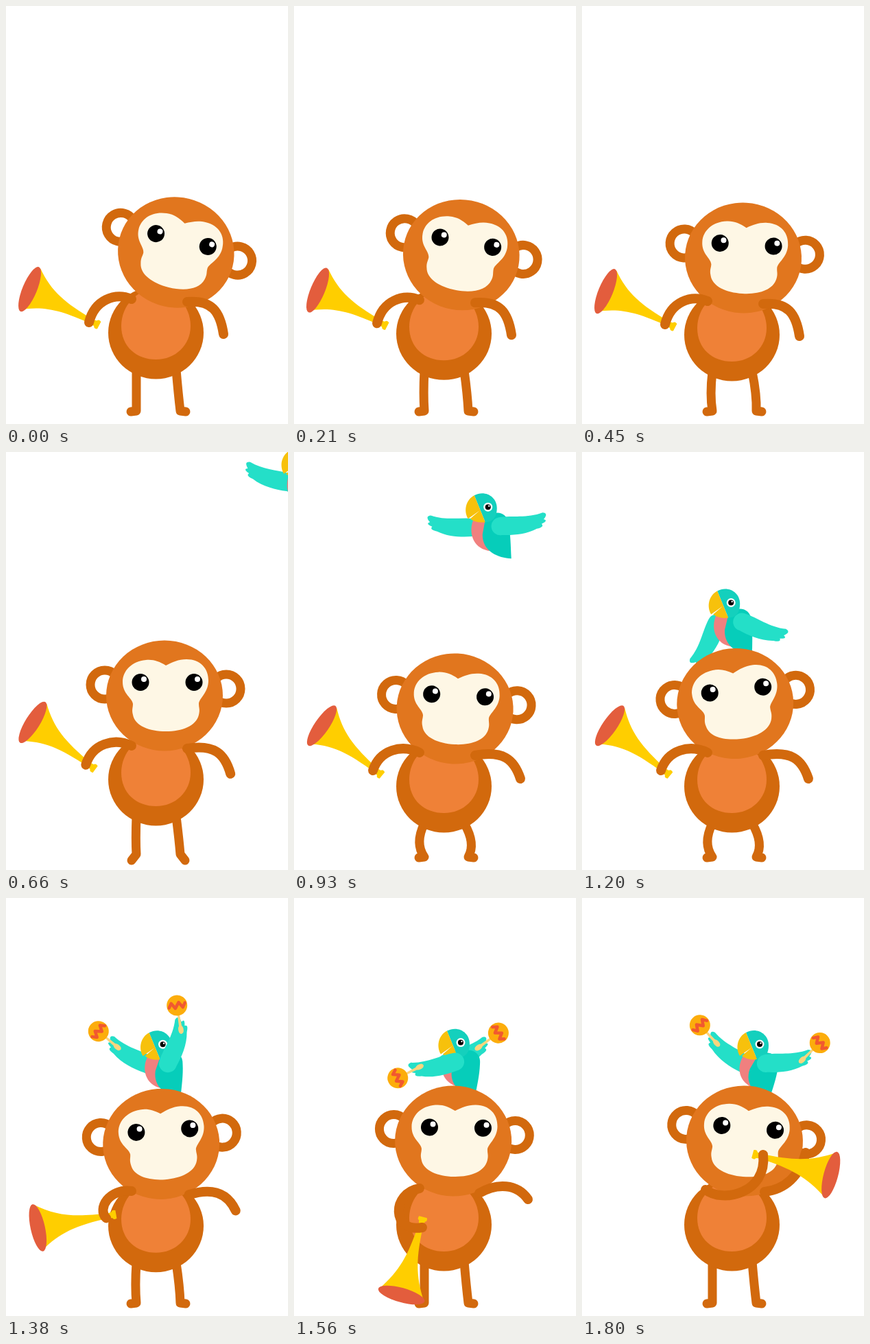
An HTML page with a canvas that plays this animation: 411 by 609 pixels, repeating every 1.83 s.

```html
<!DOCTYPE html>
<html lang="en">
<head>
<meta charset="utf-8">
<title>Monkey band</title>
<style>
html, body { margin: 0; width: 100%; height: 100%; overflow: hidden; background: #fff; }
canvas { display: block; }
</style>
</head>
<body>
<canvas id="stage" width="411" height="609"></canvas>
<script>
const ctx = document.getElementById('stage').getContext('2d');
const LOOP = 1830, STEP = 30, RAD = Math.PI / 180;
const FUR = '#e1761e', DARK = '#d2690d', BELLY = '#ef8137', CREAM = '#fef7e5';
const YELLOW = '#ffce00', RED = '#e35d3d', TEAL = '#06cdba', WING = '#24dfc8';

const shapes = {};
const addShape = (name, d) => shapes[name] = new Path2D(d);
addShape('belly', 'M168 466C168 438 190 412 218.5 412S269 438 269 466S247 515 218.5 515S168 496 168 466Z');
addShape('face', `M2 -44C-8 -50 -16 -53 -27 -52C-48 -50 -61 -36 -61 -20C-61 -2 -47 3 -46 12
  C-46 18 -48 20 -46 28C-43 44 -22 52 2 52C26 52 46 44 50 28C52 20 50 18 50 12
  C50 4 64 -4 64 -22C64 -40 52 -53 32 -53C20 -53 12 -49 2 -44Z`);
addShape('chest', 'M-22 20C-29 40 -20 62 4 64L0 20Z');
addShape('torso', 'M-4 18C5 4 28 4 30 25C33 40 33 55 34 75C15 74 -8 65 -8 40Z');
addShape('crown', 'M-20 -17C-5 -25 13 -16 13 2C13 13 8 22 -4 22Z');
addShape('beak', 'M-20 -17C-32 -11 -36 5 -29 17L-12 5L-26 17Q-17 24 -4 22Z');
addShape('wing', `M0 -13C20 -13 40 -5 64 -10Q73 -8 64 0Q71 3 60 6Q64 11 52 12
  C35 18 15 16 0 13A13 13 0 0 1 0 -13Z`);
addShape('grip', 'M-10 -3Q-14 0 -10 3Q-4 5 0 2L18 1.5V-1.5L0 -2Q-4 -5 -10 -3Z');
addShape('zigzag', 'M28 -12L34 -8L26 -3L34 3L26 8L32 12');

// Shoulder, two handles and hand, for the rest, hip and mouth poses.
const leftArm = [
  [183, 427, 159, 417, 129, 428, 121, 461],
  [183, 423, 142, 430, 142, 488, 187, 480],
  [180, 425, 205, 445, 270, 430, 264, 374]];
const rightArm = [
  [264, 431, 300, 428, 312, 445, 317, 478],
  [270, 430, 296, 415, 325, 416, 341, 439],
  [266, 428, 295, 425, 318, 405, 326, 371]];

const part = (t, a, b) => Math.min(1, Math.max(0, (t - a) / (b - a)));
const smooth = u => u * u * (3 - 2 * u);
const ease = (t, a, b) => smooth(part(t, a, b));
const wave = (t, peak, period) => Math.cos(2 * Math.PI * (t - peak) / period);

// Eased value through [time, value] points.
const through = (t, first, ...rest) => rest.reduce(
  ([t0, v0, sum], [t1, v1]) => [t1, v1, sum + (v1 - v0) * ease(t, t0, t1)],
  [...first, first[1]])[2];

function motion(t) {
  const swing = ease(t, 1230, 1560), play = ease(t, 1560, 1800);
  const raise = ease(t, 450, 750) - swing;
  const crouch = 3 * ease(t, 0, 450) - 2 * ease(t, 450, 660)
    + 10 * ease(t, 660, 930) - 11 * ease(t, 1200, 1440);
  const tilt = through(t, [0, 14], [660, 0], [930, 3], [1200, -6.5], [1800, 5]);
  const headY = through(t, [0, 359], [450, 367], [660, 355], [930, 374], [1200, 366.5], [1500, 354]);
  return { swing, play, raise, crouch, tilt, headX: 231 + 1.2 * tilt, headY };
}

function group(x, y, angle, draw) {
  ctx.save();
  ctx.translate(x, y);
  ctx.rotate(angle * RAD);
  draw();
  ctx.restore();
}

function fill(path, color) {
  ctx.fillStyle = color;
  ctx.fill(path);
}

function ellipse(x, y, rx, ry, color) {
  const path = new Path2D();
  path.ellipse(x, y, rx, ry, 0, 0, 7);
  fill(path, color);
}

function stroke(path, width, color) {
  ctx.lineWidth = width;
  ctx.strokeStyle = color;
  ctx.stroke(path);
}

// The raise grows from the shoulder to the hand.
function armCurve([rest, hip, mouth], m, raiseX, raiseY) {
  return rest.map((v, i) => {
    const lift = m.raise * Math.floor(i / 2) / 3;
    return v + (hip[i] - v) * m.swing + (mouth[i] - hip[i]) * m.play
      + (i % 2 ? m.crouch + raiseY * lift : raiseX * lift);
  });
}

function drawArm([x, y, ...curve]) {
  const path = new Path2D();
  path.moveTo(x, y);
  path.bezierCurveTo(...curve);
  stroke(path, 14, DARK);
}

function drawLeg(hipX, ankleX, side, crouch, toe) {
  const knee = (hipX + ankleX) / 2 + side * 1.3 * crouch;
  const path = new Path2D();
  path.moveTo(hipX, 530 + crouch);
  path.quadraticCurveTo(knee, 565 + crouch / 2, ankleX, 590 - 4 * toe);
  path.lineTo(ankleX + side * (8 - toe), 591 + 4 * toe);
  stroke(path, 13, DARK);
}

function drawBody(t, crouch) {
  const toe = ease(t, 450, 540) - ease(t, 660, 780);
  drawLeg(190, 190, -1, crouch, toe);
  drawLeg(248, 254, 1, crouch, toe);
  group(0, crouch, 0, () => {
    ellipse(218.5, 476, 69.5, 67.5, DARK);
    fill(shapes.belly, BELLY);
  });
}

function drawHead(m) {
  group(m.headX, m.headY, m.tilt, () => {
    for (const [x, y] of [[-87, -16], [90, -10]]) {
      const ring = new Path2D();
      ring.arc(x, y, 21, 0, 7);
      stroke(ring, 13, DARK);
    }
    ellipse(0, 0, 85, 80.5, FUR);
    fill(shapes.face, CREAM);
    for (const x of [-35, 43]) {
      ellipse(x, -19.5, 12.5, 12.5, '#000');
      ellipse(x + 5, -24, 4, 4, '#fff');
    }
  });
}

function drawHorn(m, handX, handY) {
  const length = 114 + 4 * m.swing;
  group(handX, handY, 207.5 + 12 * m.raise - 102 * m.swing - 90.5 * m.play, () => {
    ctx.translate(-15, 3);
    fill(new Path2D(`M0 -6Q5 -8 6 -4.5L11 -3.5C60 -6 85 -12 ${length} -34V34
      C85 12 60 6 11 3.5L6 4.5Q5 8 0 6Z`), YELLOW);
    group(length, 0, 5 * m.swing - 5, () => ellipse(0, 0, 10.5, 35, RED));
  });
}

// Feathers stay on the lower side whichever way the wing points.
function drawWing(x, y, angle, size, shake) {
  const flip = Math.cos(angle * RAD) < 0 ? -1 : 1;
  group(x, y, angle, () => {
    ctx.scale(1, flip);
    fill(shapes.wing, WING);
    if (!size) return;
    group(58, 0, shake - 9, () => {
      ctx.scale(size, size);
      fill(shapes.grip, '#fbd57e');
      ellipse(30, 0, 15, 15, '#fcad0c');
      stroke(shapes.zigzag, 4.5, '#f1592f');
    });
  });
}

function drawBird(t, m) {
  const fly = part(t, 540, 1170), perch = part(t, 1200, 1800);
  const along = (a, b, c) => a * (1 - fly) ** 2 + 2 * b * fly * (1 - fly) + c * fly ** 2;
  const x = along(532, 250, m.headX - 6 + 28 * perch);
  const y = along(21, -21, m.headY - 147 + 6 * perch);

  const land = ease(t, 930, 1200), flap = 12 * wave(t, 660, 360) * (1 - land);
  const front = -9 - flap + 27 * land - 208 * m.swing + 181 * m.play;
  const back = 187 + flap - 69 * land + 215 * m.swing - 115 * m.play;
  const lean = 20 * part(t, 1080, 1800), size = ease(t, 1230, 1350);

  group(x, y, 0, () => {
    drawWing(-21, 30, back, size, 0);
    group(0, 20, lean, () => {
      ctx.translate(0, -20);
      fill(shapes.chest, '#f0807f');
      fill(shapes.torso, TEAL);
    });
    fill(shapes.crown, '#14d0bd');
    fill(shapes.beak, '#f7c10c');
    ellipse(0, 0, 6.5, 6.5, '#fff');
    ellipse(0, 0, 4, 4, '#000');
    ellipse(1.5, -1.5, 1.2, 1.2, '#fff');
    const rootX = 8 + 10 * Math.cos(front * RAD) - .45 * lean;
    drawWing(rootX, 28, front, size, -26 * wave(t, 1800, 480));
  });
}

function draw(t) {
  const m = motion(t), left = armCurve(leftArm, m, -6, -8);
  ctx.fillStyle = '#fff';
  ctx.fillRect(0, 0, 411, 609);
  ctx.lineCap = ctx.lineJoin = 'round';
  drawBody(t, m.crouch);
  drawBird(t, m);
  drawHead(m);
  drawArm(armCurve(rightArm, m, 13, -13));
  drawHorn(m, left[6], left[7]);
  drawArm(left);
}

const start = performance.now();
function frame() {
  const t = (performance.now() - start) % LOOP;
  draw(Math.floor(t / STEP) * STEP);
  requestAnimationFrame(frame);
}
frame();
</script>
</body>
</html>
```
